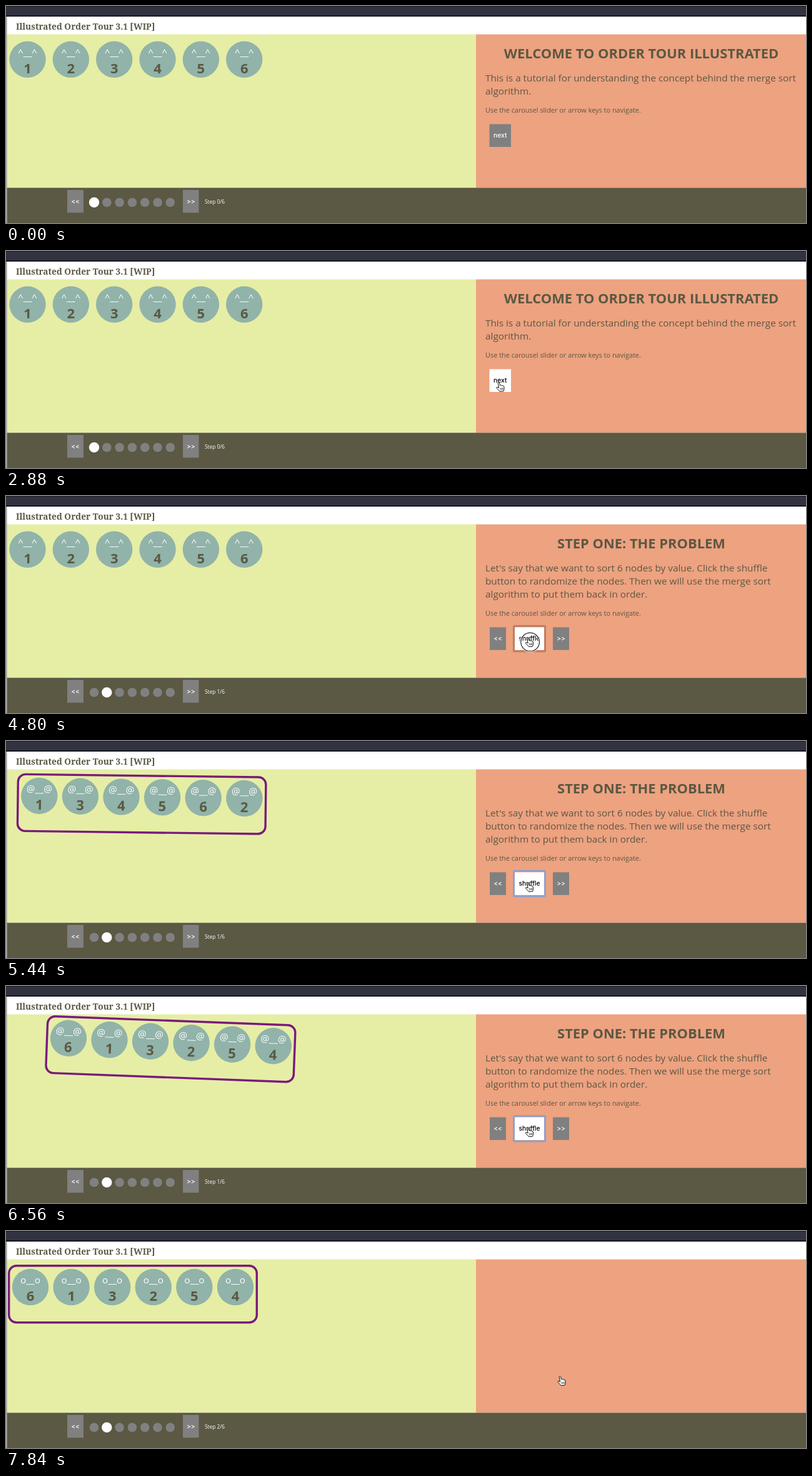
An HTML page that plays this animation: 1280x348 px, repeating every 8 s.

```html
<!DOCTYPE html>
<html lang="en">
<head>
<meta charset="utf-8">
<title>Sorting tutorial</title>
<style>
  html, body { margin: 0; width: 100%; height: 100%; overflow: hidden; }
  svg { display: block; width: 100%; height: 100%; }
  text { font-family: "Open Sans", sans-serif; fill: #5b5843; white-space: pre; }
  .title { font: bold 13.7px "Noto Serif", serif; }
  .head { font-size: 21.9px; font-weight: 700; text-anchor: middle; }
  .body { font-size: 15.3px; }
  .hint { font-size: 10.93px; }
  .num { font-size: 22px; font-weight: 700; text-anchor: middle; }
  .face { font-size: 15.3px; text-anchor: middle; fill: #fff; }
  .btn { font: 500 10.3px Inter, sans-serif; text-anchor: middle; }
  .step { font-size: 8.35px; fill: #fff; }
</style>
</head>
<body>
<svg viewBox="0 0 1280 348" preserveAspectRatio="none">
  <defs><clipPath id="page"><rect x="2" y="0" width="1278" height="348"/></clipPath></defs>
  <rect width="1280" height="348" fill="#fff"/>
  <rect width="1280" height="17" fill="#323340"/>
  <path d="M0 .5H1280" stroke="#1b1b22"/>
  <path d="M0 16H1280" stroke="#0d0d12" stroke-width="1.6"/>
  <text class="title" x="16" y="37.5">Illustrated Order Tour 3.1 [WIP]</text>
  <rect y="45.5" width="752" height="246" fill="#e6eea5"/>
  <rect x="752" y="45.5" width="528" height="246" fill="#eda280"/>
  <rect y="291.5" width="1280" height="56.5" fill="#5b5843"/>
  <rect y="17" width="1.7" height="331" fill="#aaa"/>
  <g id="nodes" clip-path="url(#page)"></g>
  <g id="panel"></g>
  <g id="footer"></g>
  <g id="pointer"></g>
</svg>
<script>
const LOOP = 8000, TICK = 160;
const NEXT_CLICK = 3360, SHUFFLE_1 = 4800, SHUFFLE_2 = 6240, LAST_CLICK = 7680;
const el = id => document.getElementById(id);
const esc = s => s.replace(/</g, "&lt;").replace(/>/g, "&gt;");
const clamp = v => Math.max(0, Math.min(1, v));
const ramp = (t, a, b) => clamp((t - a) / (b - a));
const smooth = u => u * u * (3 - 2 * u);
const label = (cls, x, y, s, extra = "") => `<text class="${cls}" x="${x}" y="${y}" ${extra}>${esc(s)}</text>`;

// The CSS "ease" curve, cubic-bezier(.25, .1, .25, 1)
function ease(x) {
  const bez = (u, a, b) => 3 * u * (1 - u) ** 2 * a + 3 * u * u * (1 - u) * b + u ** 3;
  let lo = 0, hi = 1;
  for (let i = 0; i < 24; i++) {
    const mid = (lo + hi) / 2;
    if (bez(mid, .25, .25) < x) lo = mid; else hi = mid;
  }
  return bez(lo, .1, 1);
}

// Progress, shift in percent of the width, angle in degrees
const WOBBLE = [[0, 0, 0], [.15, -25, -5], [.3, 20, 3], [.45, -15, -3], [.6, 10, 2], [.75, -5, -1], [1, 0, 0]];
const PATH = [[160, 196, 350], [640, 152, 318], [1120, 165.5, 315.5], [1600, 165.5, 315.5], [2560, 788.5, 210.5],
  [3840, 788.5, 210.5], [4480, 835, 227], [7200, 835, 227], [7520, 886.5, 233]];
const CLICKS = [1280, NEXT_CLICK, SHUFFLE_1, SHUFFLE_2, LAST_CLICK];

function along(keys, t, curve) {
  if (t <= keys[0][0]) return keys[0].slice(1);
  const i = keys.findIndex(k => k[0] > t);
  if (i < 0) return keys[keys.length - 1].slice(1);
  const a = keys[i - 1], b = keys[i], u = curve(ramp(t, a[0], b[0]));
  return [1, 2].map(k => a[k] + (b[k] - a[k]) * u);
}

const inside = (b, p) => p[0] >= b.x && p[0] <= b.x + b.w && p[1] >= b.y && p[1] <= b.y + b.h;

function button(b, p) {
  const hot = inside(b, p);
  return `<rect x="${b.x}" y="${b.y}" width="${b.w}" height="${b.h}" fill="${hot ? "#fff" : "#808080"}"/>` +
    label("btn", b.x + b.w / 2, b.y + b.h / 2 + 3.7, b.s, `style="fill:${hot ? "#000" : "#fff"}"`);
}

const FOOT_BUTTONS = [{ x: 98, y: 295, w: 26, h: 36.5, s: "<<" }, { x: 283, y: 295, w: 25.5, h: 36.5, s: ">>" }];
const SLIDES = [
  {
    head: "WELCOME TO ORDER TOUR ILLUSTRATED",
    lines: ["This is a tutorial for understanding the concept behind the merge sort", "algorithm."],
    buttons: [{ x: 773.5, y: 189.5, w: 34.5, h: 36.5, s: "next" }]
  },
  {
    head: "STEP ONE: THE PROBLEM",
    lines: ["Let's say that we want to sort 6 nodes by value. Click the shuffle",
      "button to randomize the nodes. Then we will use the merge sort",
      "algorithm to put them back in order."],
    buttons: [{ x: 774, y: 210.5, w: 26, h: 36.5, s: "<<" }, { x: 814, y: 210.5, w: 47, h: 36.5, s: "shuffle" },
      { x: 875, y: 210.5, w: 26, h: 36.5, s: ">>" }]
  }
];

function drawNodes(t) {
  const mixed = t > SHUFFLE_1;
  const start = (t > SHUFFLE_2 ? SHUFFLE_2 : SHUFFLE_1) + 1;
  const p = (t - start) / 1000;
  const shaking = mixed && p < 1;
  const order = !mixed ? "123456" : t > SHUFFLE_2 ? "613254" : "134562";
  const face = !mixed ? "^__^" : shaking ? "@__@" : "o__o";
  const [x0, gap, y] = mixed ? [39, 65.6, 90] : [34.5, 69.35, 85.7];
  let out = mixed ? `<rect x="4.7" y="55.7" width="396.6" height="91" rx="12" fill="none" stroke="#7a1a7c" stroke-width="3.4"/>` : "";
  [...order].forEach((n, i) => {
    const x = x0 + gap * i;
    out += `<circle cx="${x}" cy="${y}" r="29.2" fill="#91b3a9"/>` +
      label("face", x, y - 6, face) + label("num", x, y + 22, n);
  });
  const [shift, angle] = shaking ? along(WOBBLE, p, ease) : [0, 0];
  el("nodes").innerHTML = `<g transform="translate(${shift * 4} 0) rotate(${angle} 203 101)">${out}</g>`;
}

function drawPanel(t, slide, p) {
  const s = SLIDES[slide], n = s.lines.length;
  let out = label("head", 1016.5, 84, s.head);
  s.lines.forEach((line, i) => out += label("body", 767, 121 + 21 * i, line));
  out += label("hint", 767, 129 + 21 * n, "Use the carousel slider or arrow keys to navigate.");
  out += s.buttons.map(b => button(b, p)).join("");
  if (slide && t >= SHUFFLE_1 && t < LAST_CLICK) {
    const ring = t === SHUFFLE_1 ? "#bd7f62" : "#909fcd";
    out += `<rect x="812.5" y="208.5" width="50" height="40.5" rx="1" fill="none" stroke="${ring}" stroke-width="3"/>`;
  }
  const alpha = slide ? ramp(t, 3760, 4080) * (1 - ramp(t, 7600, 7840)) : 1 - ramp(t, 3280, 3520);
  el("panel").setAttribute("opacity", alpha);
  el("panel").innerHTML = out;
}

function drawFooter(t, slide, p) {
  let out = FOOT_BUTTONS.map(b => button(b, p)).join("");
  for (let i = 0; i < 7; i++) {
    const x = 141 + 20.3 * i, on = i === slide;
    const over = t >= 160 && Math.hypot(p[0] - x, p[1] - 315) < 7;
    out += `<circle cx="${x}" cy="315" r="${on ? 8.2 : 7.3}" fill="${on ? "#fff" : over ? "#68665a" : "#808080"}"/>`;
  }
  const step = t >= LAST_CLICK ? 2 : t >= NEXT_CLICK ? 1 : 0;
  el("footer").innerHTML = out + label("step", 318, 317, `Step ${step}/6`);
}

function drawPointer(t, slide, p) {
  let out = "";
  if (t >= 160) {
    const hand = [...FOOT_BUTTONS, ...SLIDES[slide].buttons].some(b => inside(b, p));
    const shape = hand
      ? `<path d="M-1.4 .6Q-.4 -1 .9 .6L2 5Q3.3 4.2 4.2 5.2Q5.6 4.5 6.4 5.8Q8 5.4 8.4 7L8.6 10.2Q8.4 12 7.6 14.2L1.6 14.8Q-.6 12 -3.4 9.4Q-4 7.4 -1.8 7.8L.1 9Z" fill="#fff" stroke="#111"/>
         <path d="M2.4 9.2L2.8 12.4M4.5 9L4.8 12.2M6.4 8.8L6.6 12" stroke="#111" stroke-width=".8"/>`
      : `<path d="M0 0V13L3 10.2L5.1 15L7.3 14L5.2 9.4H9.2Z" fill="#111" stroke="#fff"/>`;
    out = shape;
    if (CLICKS.some(c => t >= c && t < c + TICK))
      out += `<g fill="none"><circle cx="3.6" cy="7.2" r="14.8" stroke="#fff" stroke-width="3.2"/>
        <circle cx="3.6" cy="7.2" r="14.8" stroke="#222" stroke-width="1.2"/></g>`;
  }
  el("pointer").innerHTML = `<g transform="translate(${p})">${out}</g>`;
}

function draw(t) {
  const slide = t >= 3680 ? 1 : 0;
  const p = along(PATH, t, smooth);
  drawNodes(t);
  drawPanel(t, slide, p);
  drawFooter(t, slide, p);
  drawPointer(t, slide, p);
}

const origin = performance.now();
let shown = -1;
function frame() {
  const now = (performance.now() - origin + 4) % LOOP;
  const t = Math.floor(now / TICK) * TICK;
  if (t !== shown) draw(shown = t);
  requestAnimationFrame(frame);
}
frame();
</script>
</body>
</html>
```
